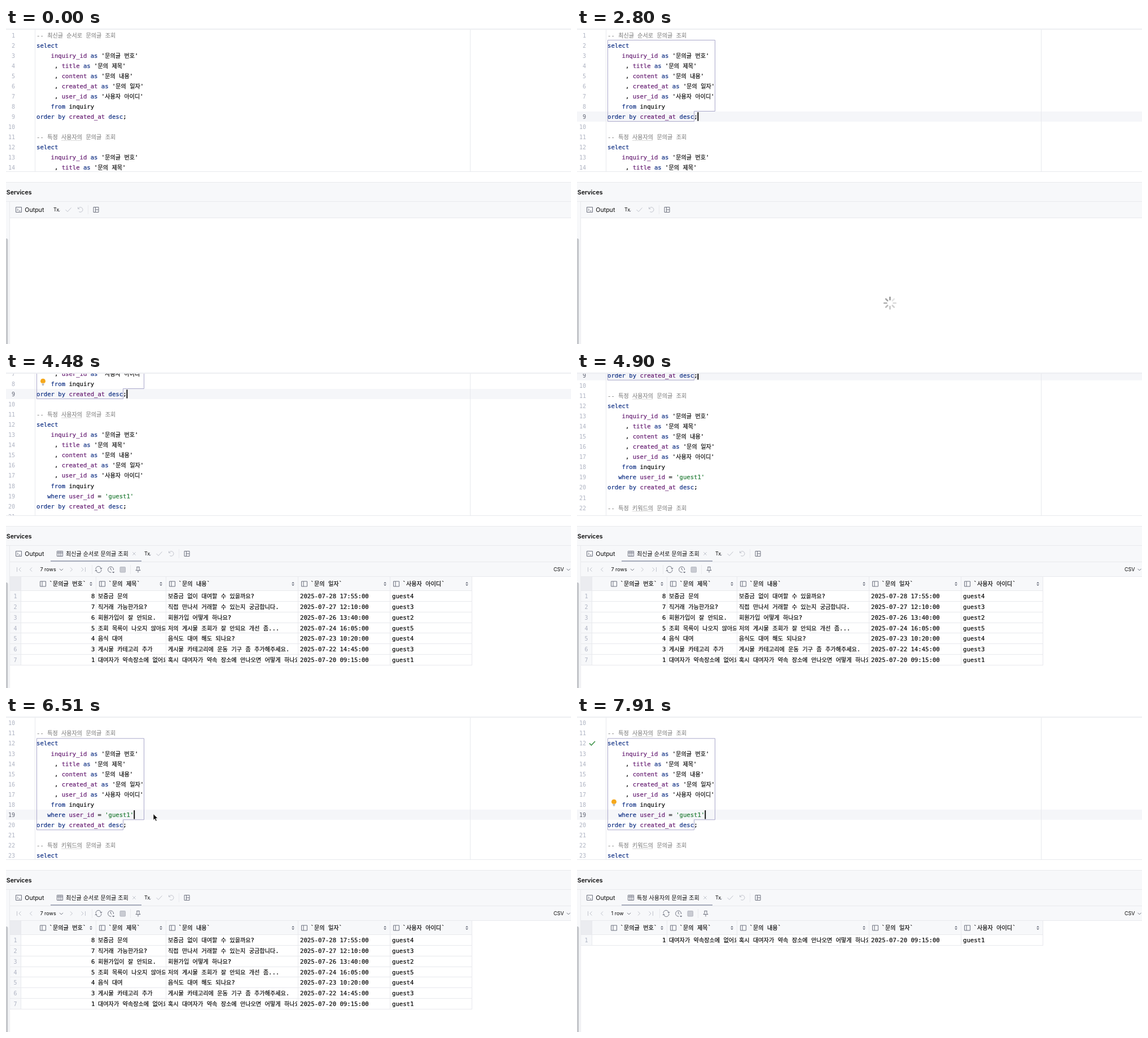
These frames come from a looping animation (1001x560 px, 8000 ms). An HTML page:

```html
<!DOCTYPE html>
<html lang="ko">
<head>
<meta charset="utf-8">
<title>SQL console</title>
<style>
html, body { margin: 0; width: 100%; height: 100%; overflow: hidden; background: #fff; }
svg { display: block; }
text { white-space: pre; font: 10.6px Inter, sans-serif; color: #080808; }
text, tspan { fill: currentColor; }
.mono { font-family: "DejaVu Sans Mono", monospace; }
.mono, .mono tspan { stroke: currentColor; stroke-width: .2px; }
.ko { font-family: "Noto Sans CJK KR", "Noto Sans CJK", sans-serif; font-size: .95em; }
.small { font-size: 9px; }
.bold { font-weight: 600; }
.end { text-anchor: end; }
.cell { font-size: 10.65px; }
.kw { color: #0b2c82; }
.col { color: #641a70; }
.str { color: #1f7a33; }
.note { color: #8c8c8c; }
.num { font-size: 10px; text-anchor: end; color: #aeb3c2; stroke: none; }
.num.on { color: #5f6473; }
.icon { fill: none; stroke: #6c707e; }
.off { stroke: #c0c3cc; }
.rule { stroke: #e8e9ed; fill: none; }
.panel { fill: #f7f8fa; }
</style>
</head>
<body>
<svg id="stage" width="1001" height="560" viewBox="0 0 1001 560"></svg>
<script>
const LOOP = 8000, TICK = 70, PITCH = 18.06;
const lineTop = n => 3.4 + PITCH * (n - 1);
const crisp = v => Math.floor(v) + 0.5;

// Markup helpers
const ko = s => s.replace(/[가-힣]+/g, m => `<tspan class="ko">${m}</tspan>`);
const text = (x, y, s, cls = '') => `<text x="${x}" y="${y}" class="${cls}">${s}</text>`;
const rect = (x, y, w, h, attr = 'class="panel"') => `<rect x="${x}" y="${y}" width="${w}" height="${h}" ${attr}/>`;
const icon = (x, y, d, cls = '') => `<path class="icon ${cls}" transform="translate(${x} ${y})" d="${d}"/>`;
const rule = d => `<path class="rule" d="${d}"/>`;
const group = (id, body) => `<g id="${id}">${body}</g>`;

// Icon outlines, centred on 0,0
const DOWN = 'M-3-1.5L0 1.5L3-1.5', LEFT = 'M2-3.5L-1.5 0L2 3.5', RIGHT = 'M-2-3.5L1.5 0L-2 3.5';
const CHECK = 'M-5 0L-1.5 3.5L5-3.5';
const TABLE = 'M-5-4.5H5V4.5H-5ZM-5-1.5H5M-1.7-4.5V4.5M1.7-4.5V4.5';
const COLUMN = 'M-5-4.5H5V4.5H-5ZM-1.5-4.5V4.5';

// Editor
const KEYWORDS = 'select as from where order by desc'.split(' ');
const COLUMNS = 'inquiry_id title content created_at user_id'.split(' ');
const fields = [
  'select',
  "    inquiry_id as '문의글 번호'",
  "     , title as '문의 제목'",
  "     , content as '문의 내용'",
  "     , created_at as '문의 일자'",
  "     , user_id as '사용자 아이디'",
  '    from inquiry'
];
const order = 'order by created_at desc;';
const code = [
  '-- 최신글 순서로 문의글 조회', ...fields, order, '',
  '-- 특정 사용자의 문의글 조회', ...fields, "   where user_id = 'guest1'", order, '',
  '-- 특정 키워드의 문의글 조회', 'select'
];

function paint(line) {
  if (line.startsWith('--')) return `<tspan class="note">${ko(line)}</tspan>`;
  return line.replace(/'[^']*'|\w+/g, w => {
    if (w[0] === "'" && /[가-힣]/.test(w)) return ko(w);
    const cls = w[0] === "'" ? 'str' : KEYWORDS.includes(w) ? 'kw' : COLUMNS.includes(w) ? 'col' : '';
    return cls ? `<tspan class="${cls}">${w}</tspan>` : w;
  });
}

function outline(id, first, last) {
  const a = crisp(lineTop(first)), b = crisp(lineTop(last)), c = crisp(lineTop(last + 1) - 0.4);
  return group(id, `<path d="M54.5 ${a}H244.5V${b}H207.5V${c}H54.5Z" fill="none" stroke="#aaa8cb"/>`);
}

const bulb = (id, n) => group(id,
  `<g transform="translate(65.5 ${lineTop(n) + 6})"><path d="M0-6A4.3 4.3 0 0 1 2.3 2H-2.3A4.3 4.3 0 0 1 0-6Z" fill="#f5a81c"/>
  <path d="M-2 3.4H2M-1.3 5.3H1.3" stroke="#8a8d98" stroke-width="1.2"/></g>`);

const passed = (id, n) => group(id,
  `<path transform="translate(27 ${lineTop(n) + 9})" d="${CHECK}" fill="none" stroke="#4d9a57" stroke-width="1.7"/>`);

function squiggle(n) {
  const y = lineTop(n) + 16;
  return `<path d="M98 ${y}${'l1.5-1.5l1.5 1.5'.repeat(12)}" fill="none" stroke="#c9c9c9" stroke-width=".8"/>`;
}

const editor = `<svg y="3" width="1001" height="251" viewBox="0 3 1001 251"><g id="scroll">
  <g id="current">${rect(0, 0, 1001, PITCH, 'fill="#f5f6f9"')}</g>
  ${code.map((line, i) => {
    const y = lineTop(i + 1) + 13.1;
    return text(16, y, i + 1, 'mono num') + text(54, y, paint(line), 'mono');
  }).join('')}
  ${text(16, lineTop(24) + 13.1, 24, 'mono num')}
  ${squiggle(11)}${squiggle(22)}
  ${outline('box1', 2, 9)}${outline('box2', 12, 20)}
  ${bulb('bulb1', 8)}${bulb('bulb2', 18)}${passed('ok1', 2)}${passed('ok2', 12)}
  ${rect(0, 0, 1.8, 15.5, 'id="caret" fill="#000"')}
  </g></svg>`;

// Result grid
const edges = [27, 160, 284, 518, 681, 826];
const heads = ['문의글 번호', '문의 제목', '문의 내용', '문의 일자', '사용자 아이디'];
const iconX = [65.5, 170.5, 294.5, 528.5, 691.5];
const rows = [
  [8, '보증금 문의', '보증금 없이 대여할 수 있을까요?', '2025-07-28 17:55:00', 'guest4'],
  [7, '직거래 가능한가요?', '직접 만나서 거래할 수 있는지 궁금합니다.', '2025-07-27 12:10:00', 'guest3'],
  [6, '회원가입이 잘 안되요.', '회원가입 어떻게 하나요?', '2025-07-26 13:40:00', 'guest2'],
  [5, '조회 목록이 나오지 않아요', '저의 게시물 조회가 잘 안되요 개선 좀...', '2025-07-24 16:05:00', 'guest5'],
  [4, '음식 대여', '음식도 대여 해도 되나요?', '2025-07-23 10:20:00', 'guest4'],
  [3, '게시물 카테고리 추가', '게시물 카테고리에 운동 기구 좀 추가해주세요.', '2025-07-22 14:45:00', 'guest3'],
  [1, '대여자가 약속장소에 없어요', '혹시 대여자가 약속 장소에 안나오면 어떻게 하나요?', '2025-07-20 09:15:00', 'guest1']
];

const head = rect(7, 363, 819, 24) + rect(7, 363, 19.5, 24, 'fill="#ebecf0"') +
  rule('M7 387.5H826' + edges.map(x => `M${x - 0.5} 363V387`).join('')) +
  heads.map((h, i) => icon(iconX[i], 375.5, COLUMN) +
    text(iconX[i] + 11, 379.2, ko('`' + h + '`'), 'mono cell') +
    `<path transform="translate(${edges[i + 1] - 9.5} 375.5)" d="M-2.5-1L0-3.5L2.5-1ZM-2.5 1L0 3.5L2.5 1Z" fill="#6c707e"/>`).join('');

function grid(id, list) {
  const h = 18.87, end = crisp(387.5 + h * list.length);
  let out = rect(7, 388, 20, end - 388) + rule(edges.map(x => `M${x - 0.5} 388V${end}`).join(''));
  list.forEach((row, r) => {
    const y = 387.5 + h * r, base = y + 13.4;
    out += rule(`M7 ${crisp(y + h)}H826`) + text(19.5, base, r + 1, 'mono num') +
      text(157.5, base, row[0], 'mono cell end');
    row.slice(1).forEach((cell, i) => {
      const x = edges[i + 1];
      out += `<svg x="${x}" y="${y}" width="${edges[i + 2] - x - 2}" height="${h}">${text(3, 13.4, ko(cell), 'mono cell')}</svg>`;
    });
  });
  return group(id, out);
}

// Tool window
const frame = rect(0, 0, 1001, 2) + rule('M0 2.5H1001M51.5 3V254M822.5 3V254M0 254.5H1001') +
  rect(0, 274, 1001, 62) + rect(0, 336, 6, 224) +
  rule('M0 273.5H1001M0 307.5H1001M6 336.5H1001M6.5 308V560') +
  rect(-3, 373, 6.5, 190, 'rx="3" fill="#c6c8cc"') +
  text(0.8, 294.8, 'Services', 'bold') +
  icon(22.5, 322, 'M-5-4.5H5V4.5H-5ZM-3-2L-1 0L-3 2M0 2.2H3') + text(33.3, 325.8, 'Output');

const actions = group('actions', text(84, 325.3, 'Tx', 'small') +
  icon(93.8, 324.5, 'M-1.5-.8L0 .8L1.5-.8') + icon(110.5, 322, CHECK, 'off') +
  icon(132, 322, 'M-4.5-4.5V-1.5H-1.5M-4.3-1.7A4.3 4.3 0 1 1-2.6 3.6', 'off') +
  rule('M145.5 314V330') + icon(159.5, 322, 'M-4.5-4.5H4.5V4.5H-4.5ZM-1-4.5V4.5M-1 0H4.5'));

const tab = icon(95.5, 322, TABLE) + `<text id="title" x="106" y="325.8"></text>` +
  icon(227, 322, 'M-2.7-2.7L2.7 2.7M2.7-2.7L-2.7 2.7', 'off') +
  rect(79, 334, 161, 2, 'fill="#a8adbd"');

const pager = rect(7, 337, 994, 25) + rule('M7 362.5H1001') +
  icon(23, 350, 'M-3.5-4V4M3.5-3.5L0 0L3.5 3.5', 'off') + icon(44, 350, LEFT, 'off') +
  `<text id="count" x="60.5" y="353.3" class="small"></text>` +
  group('tools', icon(98, 350.3, DOWN) + icon(116, 350, RIGHT, 'off') +
    icon(137, 350, 'M3.5-4V4M-3.5-3.5L0 0L-3.5 3.5', 'off') + rule('M152.5 342V358M220.5 342V358') +
    icon(164, 350, 'M-5-.5A4.7 4.7 0 0 1 4.6-1M5 .5A4.7 4.7 0 0 1-4.6 1M6.2-2.8L4.6-.8L2.6-2.4M-6.2 2.8L-4.6 .8L-2.6 2.4') +
    icon(185.5, 350, 'M5 1A5 5 0 1 0 1 5M0-3V0L2 1.5') +
    `<path d="M188 354H192.5L190.2 356.6Z" fill="#6c707e"/>` +
    rect(202, 345.5, 9.5, 9.5, 'rx="1" fill="#c9cbd2" stroke="#b4b7c0"') +
    icon(234, 350, 'M-2.5-4.5H2.5M-2-4.5V-.5L-4 1.5H4L2-.5V-4.5M0 1.5V5.5')) +
  text(970, 353.3, 'CSV', 'small') + icon(996.5, 350.3, DOWN);

const spinner = group('spinner', Array.from({ length: 8 }, (_, i) =>
  `<path d="M0-6V-10.3" transform="rotate(${-45 * i})" stroke="#777" stroke-width="2.6" stroke-linecap="round" opacity="${0.75 - 0.08 * i}"/>`).join(''));

const mouse = group('mouse',
  `<path id="beam" d="M-3.5-6.5Q0-6.5 0-4V4Q0 6.5-3.5 6.5M3.5-6.5Q0-6.5 0-4V4Q0 6.5 3.5 6.5M-1.5 1.5H1.5" fill="none" stroke="#222" stroke-width="1.1"/>
  <path id="arrow" d="M0-.5V10.5L2.5 8.2L4.4 12.3L6.3 11.4L4.5 7.5H8Z" fill="#000" stroke="#fff" stroke-width=".8"/>`);

document.getElementById('stage').innerHTML = editor + frame + actions +
  group('results', tab + pager + head + grid('rows1', rows) + grid('rows2', rows.slice(-1))) + spinner + mouse;

// Motion
const $ = id => document.getElementById(id);
const show = (id, on) => $(id).setAttribute('display', on ? 'inline' : 'none');
const move = (id, x, y, turn = 0) => $(id).setAttribute('transform', `translate(${x} ${y}) rotate(${turn})`);
const numbers = [...document.querySelectorAll('#scroll .num')];
const easeOut = p => 1 - (1 - Math.min(1, Math.max(0, p))) ** 2;

const paths = [
  { end: 2800, keys: [[350, 440, 448], [560, 400, 362], [840, 290, 200], [1120, 232, 129],
    [1190, 262, 142], [1260, 271, 161], [1400, 261, 153], [1470, 263, 155]] },
  { end: 7070, keys: [[5180, 263, 155], [5320, 263, 167], [5530, 263, 167], [5670, 268, 176],
    [5740, 270, 183], [5880, 261, 174]] }
];

function along(keys, t) {
  const i = keys.findIndex(k => k[0] > t);
  if (i < 0) return keys[keys.length - 1].slice(1);
  const [a, b] = [keys[i - 1], keys[i]], p = (t - a[0]) / (b[0] - a[0]);
  return [a[1] + (b[1] - a[1]) * p, a[2] + (b[2] - a[2]) * p];
}

function scrollAt(t) {
  if (t < 4200) return 0;
  const first = 147 * easeOut((t - 4200 + TICK) / 630);
  return t < 4900 ? first : 147 + 15.7 * easeOut((t - 4900 + TICK) / 490);
}

function draw(now) {
  const t = Math.floor(now % LOOP / TICK) * TICK;
  const within = (a, b = LOOP) => t >= a && t < b;

  move('scroll', 0, -scrollAt(t));
  const line = t < 1260 ? 0 : t < 5880 ? 9 : 19;
  const active = line === 19 || within(1260, 5320);
  show('current', active);
  move('current', 0, lineTop(line));
  show('caret', active && !within(3920, 4200));
  move('caret', line === 19 ? 226.4 : 213.5, lineTop(line) + 1.3);
  numbers.forEach((n, i) => n.classList.toggle('on', i + 1 === line));

  show('box1', within(1820, 5320));
  show('box2', within(6230));
  show('bulb1', within(3710, 5320));
  show('bulb2', within(7910));
  show('ok1', within(3010, 5320));
  show('ok2', within(7210));

  const loaded = t >= 2940, second = t >= 7140;
  show('results', loaded);
  move('actions', loaded ? 161 : 0, 0);
  show('rows1', within(3010, 7140));
  show('rows2', second);
  $('title').innerHTML = ko(second ? '특정 사용자의 문의글 조회' : '최신글 순서로 문의글 조회');
  const single = t >= 7560;
  $('count').textContent = single ? '1 row' : '7 rows';
  move('tools', single ? -6 : 0, 0);

  show('spinner', within(2800, 3430) || within(7210, 7560));
  move('spinner', loaded ? 567.5 : 554.5, 487.5, Math.floor((t - 2800) / 140) * 45);

  const path = paths.find(p => within(p.keys[0][0], p.end));
  show('mouse', path);
  if (path) {
    const [x, y] = along(path.keys, t);
    const arrow = y > 254 || within(2380, 2800) || t >= 6510;
    move('mouse', x, y);
    show('arrow', arrow);
    show('beam', !arrow);
  }
}

const start = performance.now();
(function loop() {
  draw(performance.now() - start);
  requestAnimationFrame(loop);
})();
</script>
</body>
</html>
```
